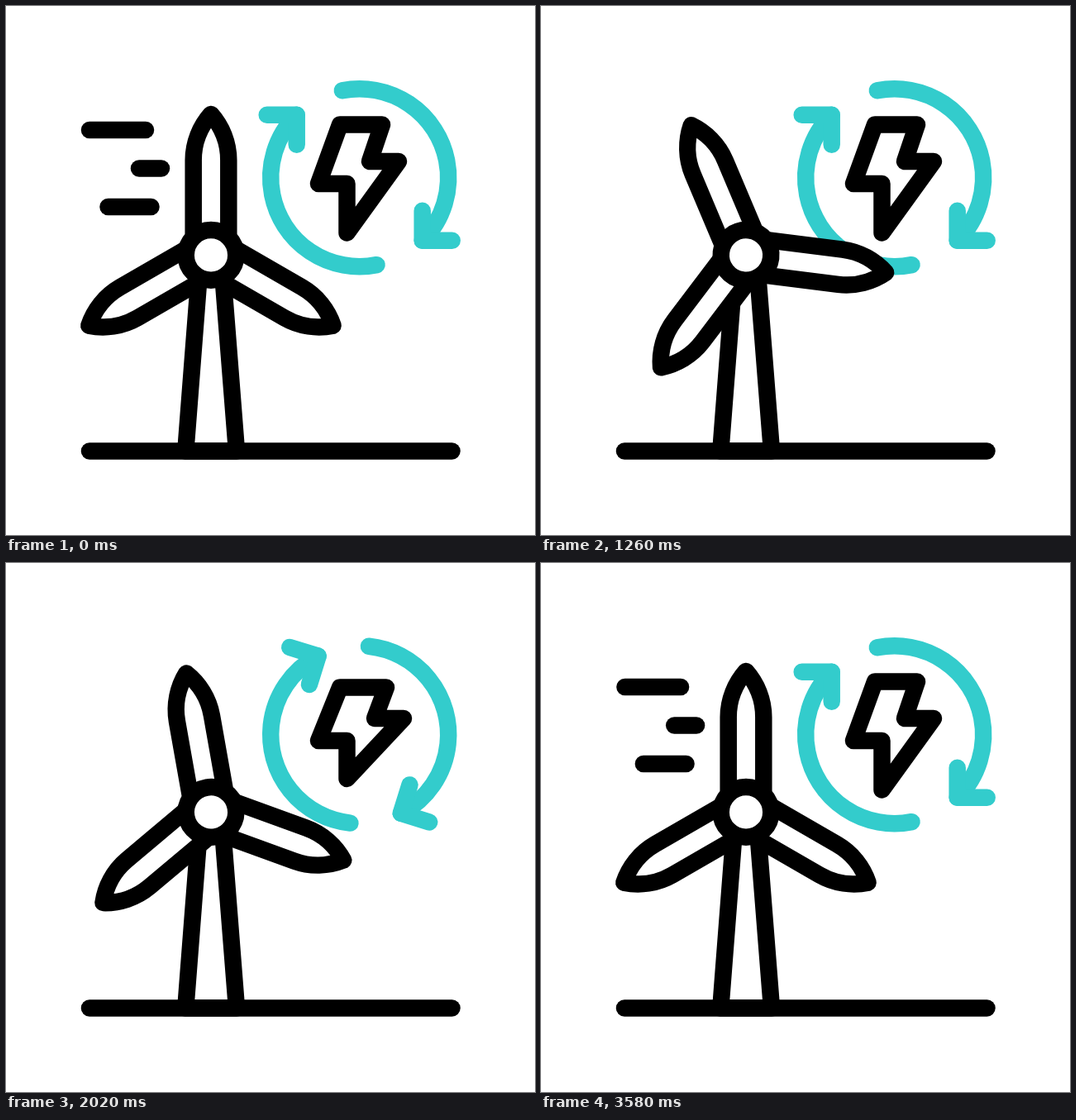
Write an HTML page with a canvas that moves like this. It is 640 px wide and 640 px high and loops after 3600 ms.

```html
<!DOCTYPE html>
<html lang="en">
<head>
<meta charset="utf-8">
<title>Wind energy</title>
<style>
html, body { margin: 0; width: 100%; height: 100%; overflow: hidden; background: #fff; }
canvas { display: block; width: 100vw; height: 100vh; }
</style>
</head>
<body>
<canvas id="stage" width="640" height="640"></canvas>
<script>
const ctx = document.getElementById('stage').getContext('2d');
const LOOP = 3600, BLACK = '#000', TEAL = '#33cccc', RAD = Math.PI / 180;
const HUB = { x: 248, y: 301.4 };

// y, right end, length
const WIND = [[150, 169, 68], [196.5, 188, 27], [243, 175.5, 52]];
const BOLT = [[404, 143.5], [455, 143.5], [440, 188], [475, 188], [412.5, 274.5], [412.5, 215], [378, 215]];
const BOLT_PUSH = [[0, 7], [5, 7], [6, 0], [6, 0], [0, -13.5], [0, 0], [0, 0]];

function ease(t, from, to) {
  const s = Math.min(1, Math.max(0, (t - from) / (to - from)));
  return s * s * (3 - 2 * s);
}

const pulse = (t, from, peak, to) => t < peak ? ease(t, from, peak) : 1 - ease(t, peak, to);

// Eased progress whose time runs along the cubic a, b, c, d.
function curveEase(t, a, b, c, d) {
  if (t <= a) return 0;
  if (t >= d) return 1;
  let lo = 0, hi = 1;
  for (let i = 0; i < 30; i++) {
    const s = (lo + hi) / 2, u = 1 - s;
    const at = u * u * u * a + 3 * u * u * s * b + 3 * u * s * s * c + s * s * s * d;
    if (at < t) lo = s; else hi = s;
  }
  return lo * lo * (3 - 2 * lo);
}

function polyline(points, closed) {
  ctx.beginPath();
  points.forEach(([x, y]) => ctx.lineTo(x, y));
  if (closed) ctx.closePath();
  ctx.stroke();
}

function drawArrows(t) {
  ctx.save();
  ctx.strokeStyle = TEAL;
  ctx.translate(427.7, 207.7);
  ctx.rotate(360 * RAD * ease(t, 1841, 3202));
  for (let i = 0; i < 2; i++) {
    ctx.beginPath();
    ctx.arc(0, 0, 107.5, -101.2 * RAD, 45 * RAD);
    ctx.stroke();
    polyline([[112, 76], [76, 76], [76, 40]]);
    ctx.rotate(Math.PI);
  }
  ctx.restore();
}

function drawBolt(t) {
  const k = pulse(t, 1840, 2020, 2200);
  polyline(BOLT.map(([x, y], i) => [x + BOLT_PUSH[i][0] * k, y + BOLT_PUSH[i][1] * k]), true);
}

function drawWind(t) {
  let shift, size;
  if (t < 2000) {
    shift = -77 * ease(t, 250, 540) + 130.5 * ease(t, 540, 1020);
    size = 1 - ease(t, 164, 1026);
  } else {
    size = ease(t, 3152, LOOP);
    shift = 15.6 * (1 - size);
  }
  if (size <= 0) return;
  for (const [y, right, length] of WIND) {
    polyline([[right + shift - length * size, y], [right + shift, y]]);
  }
}

function drawBlade() {
  ctx.beginPath();
  ctx.moveTo(-21.3, -25);
  ctx.lineTo(-21.3, -115);
  ctx.bezierCurveTo(-21.3, -136, -13, -156, 0, -170.5);
  ctx.bezierCurveTo(13, -156, 21.3, -136, 21.3, -115);
  ctx.lineTo(21.3, -25);
  ctx.fill();
  ctx.stroke();
}

function drawTurbine(t) {
  const jump = pulse(t, 426, 556, 710);
  const hubY = HUB.y - 21 * jump;
  polyline([[101 - 47 * jump, 538.5], [539.5 + 30 * jump, 538.5]]);
  polyline([[235.6, hubY], [217.3, 538.5], [279, 538.5], [260.4, hubY]]);

  ctx.save();
  ctx.translate(HUB.x, hubY);
  ctx.rotate(360 * RAD * curveEase(t, 331, 1691, 1418, 2236));
  for (let i = 0; i < 3; i++) {
    drawBlade();
    ctx.rotate(120 * RAD);
  }
  ctx.beginPath();
  ctx.arc(0, 0, 30.3, 0, 2 * Math.PI);
  ctx.fill();
  ctx.stroke();
  ctx.restore();
}

function draw(now) {
  const t = now % LOOP;
  ctx.fillStyle = '#fff';
  ctx.fillRect(0, 0, 640, 640);
  ctx.lineWidth = 20.5;
  ctx.lineCap = ctx.lineJoin = 'round';
  ctx.strokeStyle = BLACK;
  drawArrows(t);
  drawBolt(t);
  drawWind(t);
  drawTurbine(t);
}

const start = performance.now();
function tick() {
  draw(performance.now() - start);
  requestAnimationFrame(tick);
}
tick();
</script>
</body>
</html>
```
